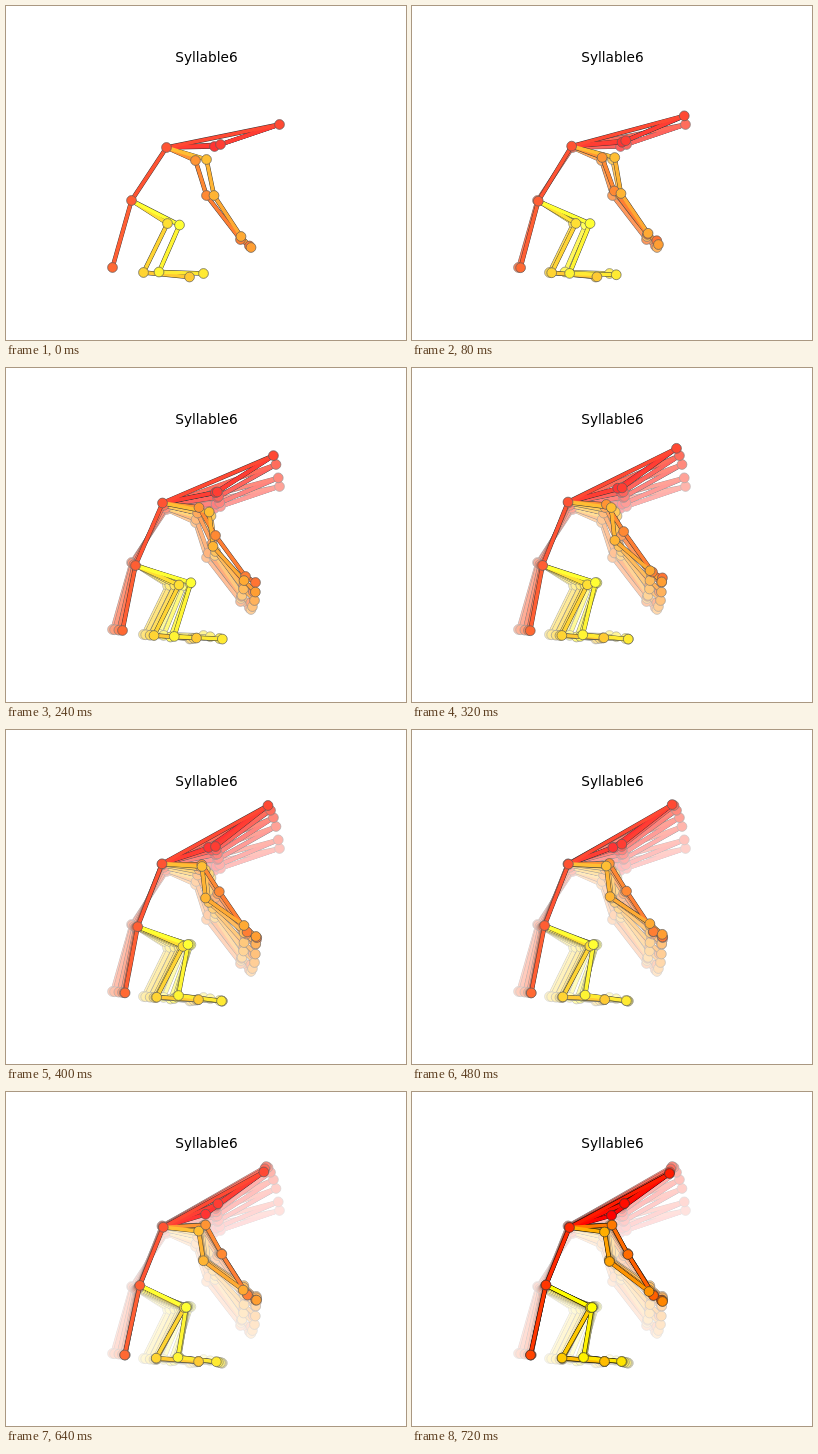
Write an HTML page with a canvas that moves like this. It is 400 px wide and 334 px high and loops after 800 ms.

```html
<!DOCTYPE html>
<html lang="en">
<head>
<meta charset="utf-8">
<title>Syllable6</title>
<style>
  html, body { margin: 0; width: 100%; height: 100%; overflow: hidden; background: #fff; }
  canvas { display: block; }
</style>
</head>
<body>
<canvas id="stage" width="400" height="334"></canvas>
<script>
const ctx = document.getElementById('stage').getContext('2d');
const STEPS = 10, STEP_MS = 80, FADE = 0.2;

// Steps at which a path of three or four points passes through them.
const KEY_STEPS = { 3: [0, 3, 9], 4: [0, 2, 5, 9] };

// Smooth curve that starts and ends at rest.
function ease(values, step) {
  const keys = KEY_STEPS[values.length], last = keys.length - 1;
  const rate = k => (values[k + 1] - values[k]) / (keys[k + 1] - keys[k]);
  const slope = k => {
    if (k === 0 || k === last) return 0;
    const before = keys[k] - keys[k - 1], after = keys[k + 1] - keys[k];
    return (rate(k - 1) * after + rate(k) * before) / (before + after);
  };
  let i = 0;
  while (i < last - 1 && keys[i + 1] <= step) i++;
  const span = keys[i + 1] - keys[i], u = (step - keys[i]) / span;
  return values[i] + (values[i + 1] - values[i]) * u * u * (3 - 2 * u)
    + span * u * (1 - u) * ((1 - u) * slope(i) - u * slope(i + 1));
}

// Joints are coloured from red to yellow in the order they are added.
const joints = [];
function joint(...path) {
  const xs = path.map(p => p[0]), ys = path.map(p => p[1]);
  joints.push(step => [ease(xs, step), ease(ys, step)]);
  return joints.length - 1;
}

const earL = joint([208, 140], [211, 129], [202, 117], [199, 123]);
const earR = joint([214, 138], [212, 128], [209, 116], [212, 111]);
const nose = joint([273, 118], [269.5, 96], [261.5, 75], [257, 81]);
const neck = joint([160, 141], [156, 134.5], [157, 135]);
const hip = joint([125, 194], [129, 197], [133.5, 192.5]);
const tail = joint([106, 261], [116, 262], [118, 262.5]);

const pawL = joint([243, 239.5], [249, 214], [249, 208]);
const wristL = joint([234, 233], [239, 208], [241, 203]);
const elbowL = joint([200, 189], [209, 167], [215.5, 162]);
const shoulderL = joint([189, 154], [192.5, 139], [199.5, 132.5]);

const pawR = joint([244.5, 241], [248, 232], [249.5, 206], [250, 209]);
const wristR = joint([234.5, 230], [237, 220.5], [237.5, 195], [236.5, 199]);
const elbowR = joint([207.5, 189], [209, 183], [199, 167.5], [197, 169]);
const shoulderR = joint([200, 153], [204.5, 147.5], [195.5, 136], [192, 139.5]);

const footL = joint([183, 270.5], [190, 269.5], [192, 269]);
const ankleL = joint([137, 266], [147.5, 267], [149.5, 265.5]);
const kneeL = joint([161, 217], [172.5, 216.5], [178, 215]);

const footR = joint([197, 267], [213, 270], [215, 270.5], [209, 269]);
const ankleR = joint([152.5, 265.5], [164, 268.5], [172, 265], [171, 265]);
const kneeR = joint([173, 218.5], [183.5, 215], [181.5, 214], [179.5, 215]);

// Each bone takes the colour of its first joint.
const chain = (...ids) => ids.slice(1).map((id, i) => [ids[i], id]);
const bones = [
  chain(earL, neck), chain(earR, neck), chain(earL, nose), chain(earR, nose),
  chain(nose, neck, hip, tail),
  chain(pawL, wristL, elbowL, shoulderL, neck),
  chain(pawR, wristR, elbowR, shoulderR, neck),
  chain(footL, ankleL, kneeL, hip),
  chain(footR, ankleR, kneeR, hip)
].flat();

const colour = i => `rgb(255, ${Math.round(255 * i / (joints.length - 1))}, 0)`;
const poses = Array.from({ length: STEPS }, (_, step) => joints.map(at => at(step)));

function drawBones(pose, width, paint) {
  ctx.lineWidth = width;
  for (const [a, b] of bones) {
    ctx.strokeStyle = paint(a);
    ctx.beginPath();
    ctx.moveTo(...pose[a]);
    ctx.lineTo(...pose[b]);
    ctx.stroke();
  }
}

function drawPose(pose) {
  ctx.save();
  ctx.translate(0.5, 0.5);
  drawBones(pose, 4.4, () => '#000');
  drawBones(pose, 3.6, colour);
  ctx.lineWidth = 0.7;
  ctx.strokeStyle = '#333';
  pose.forEach(([x, y], i) => {
    ctx.fillStyle = colour(i);
    ctx.beginPath();
    ctx.arc(x, y, 4.9, 0, 2 * Math.PI);
    ctx.fill();
    ctx.stroke();
  });
  ctx.restore();
}

function veil(alpha) {
  ctx.fillStyle = `rgba(255, 255, 255, ${alpha})`;
  ctx.fillRect(0, 0, 400, 334);
}

function render(time) {
  const current = Math.floor(time / STEP_MS) % STEPS;
  veil(1);
  // Every pose but the last is veiled, so older poses fade away.
  for (let i = 0; i <= current; i++) {
    drawPose(poses[i]);
    if (i < STEPS - 1) veil(FADE);
  }
  ctx.fillStyle = '#000';
  ctx.font = '13.7px "DejaVu Sans", sans-serif';
  ctx.textAlign = 'center';
  ctx.fillText('Syllable6', 200.4, 56);
}

const start = performance.now();
function tick() {
  render(performance.now() - start);
  requestAnimationFrame(tick);
}
tick();
</script>
</body>
</html>
```
